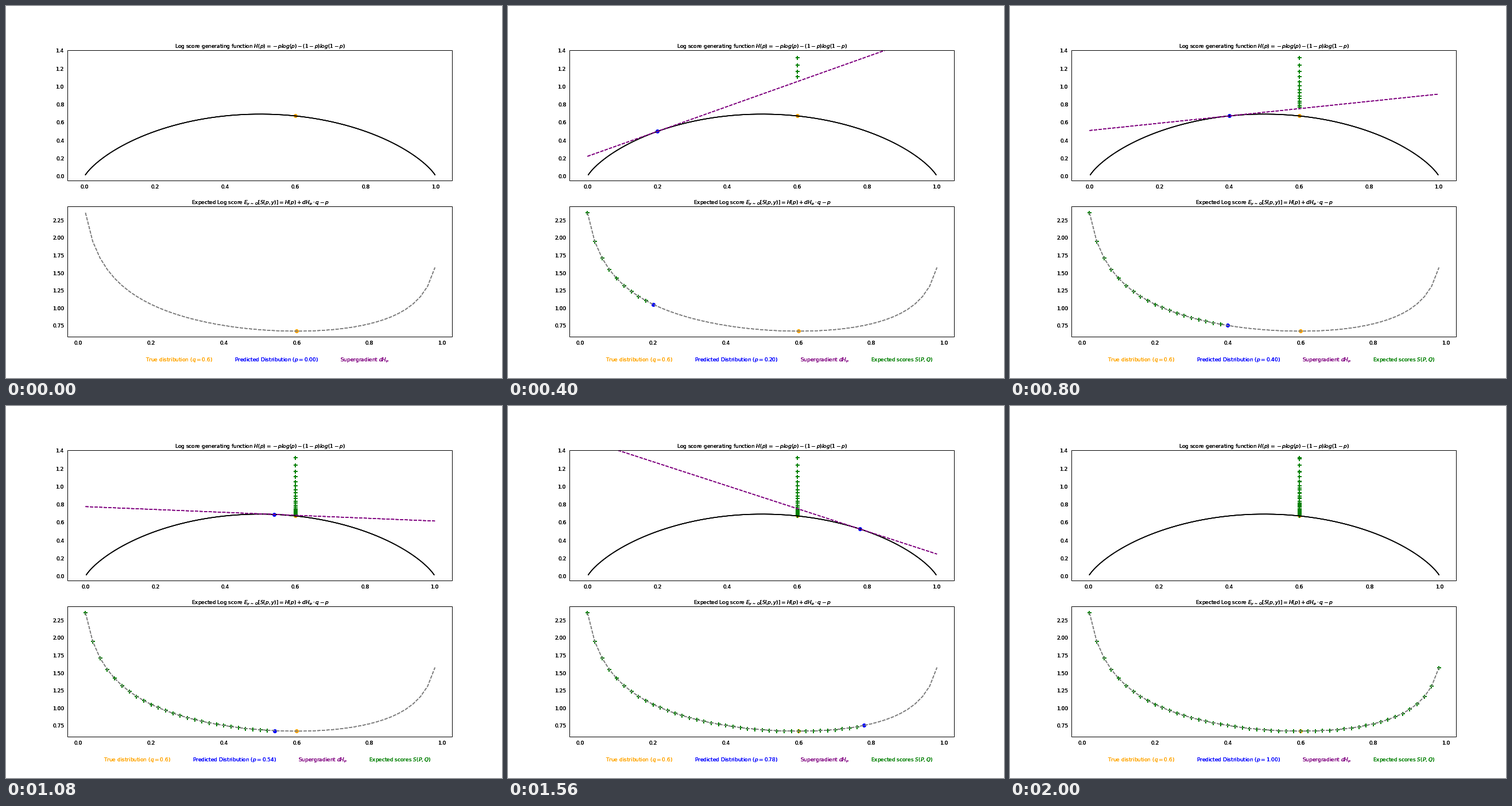
Recreate the animation shown at these times as a matplotlib script. Size 864x648 px, loop 2040 ms.

```python
import numpy as np
import matplotlib.pyplot as plt
from matplotlib.animation import FuncAnimation
from matplotlib.collections import PathCollection
from matplotlib.lines import Line2D
from matplotlib.patches import Rectangle
from matplotlib.text import Text
from matplotlib.transforms import Affine2D

W, H, DPI = 864, 648, 72
STEPS = 50
Q = 0.6

plt.rcParams.update({
    "font.family": "DejaVu Sans",
    "font.size": 9,
    "mathtext.fontset": "dejavusans",
    "lines.linewidth": 1.5,
})


def entropy(p):
    return -p * np.log(p) - (1 - p) * np.log(1 - p)


def slope(p):
    return np.log((1 - p) / p)


def score(p):
    """Expected log score of forecast p under the true probability Q."""
    return entropy(p) + slope(p) * (Q - p)


def padded(lo, hi, margin=0.05):
    pad = margin * (hi - lo)
    return lo - pad, hi + pad


def style(ax, title, yticks, fmt):
    ax.set_title(title, fontsize=9, pad=4.5)
    ax.tick_params(axis="x", length=0, pad=6.7)
    ax.tick_params(axis="y", length=0, pad=6.3)
    ax.set_xticks(np.arange(6) / 5, [f"{k / 5:.1f}" for k in range(6)])
    ax.set_yticks(yticks, [format(y, fmt) for y in yticks])
    # Frame on the outer pixel of the axes edge
    ax.spines[:].set_visible(False)
    ax.add_patch(Rectangle((0, 0), 1, 1, fill=False, lw=1, zorder=2.5,
                           clip_on=False,
                           transform=ax.transAxes + Affine2D().translate(-1, 1)))


def dots(ax, color, x=(), y=()):
    return ax.scatter(x, y, s=25, color=color, linewidths=1.5)


def crosses(ax):
    return ax.scatter([], [], s=49, marker="+", color="green", linewidths=1.5)


def harden(artist, passes=3):
    """Draw an artist several times over, so its soft edges turn solid."""
    draw = artist.draw

    def repeat(renderer):
        for _ in range(passes):
            draw(renderer)

    artist.draw = repeat


fig, (top, low) = plt.subplots(2, 1, figsize=(W / DPI, H / DPI), dpi=DPI)
fig.subplots_adjust(left=0.125, right=0.9, bottom=0.11, top=0.88, hspace=0.2)

style(top,
      r"Log score generating function $H(p) {=} -plog(p) - (1-p)log(1-p)$",
      np.arange(8) / 5, ".1f")
style(low,
      r"Expected Log score $E_{y\,\sim\,Q}[S(p, y)] = H(p) + dH_p \cdot q - p$",
      np.arange(3, 10) / 4, ".2f")

# Generating function and its tangent
xs = np.linspace(0, 1, 400)[1:-1]
top.plot(xs, entropy(xs), color="black")
tangent, = top.plot([], [], "--", color="purple")
top.set_ylim(-0.05, 1.4)

# Expected score
ps = np.arange(1, STEPS) / STEPS
scores = score(ps)
low.plot(ps, scores, "--", color="gray")
low.set_xlim(*padded(ps[0], ps[-1]))
low.set_ylim(*padded(scores.min(), scores.max()))

for ax in (top, low):
    dots(ax, "orange", [Q], [entropy(Q)])
top_cross, low_cross = crosses(top), crosses(low)
top_dot, low_dot = dots(top, "blue"), dots(low, "blue")

# Caption row: x offset, text, colour
CAPTIONS = [
    (0, "True distribution ($q = 0.6$)", "orange"),
    (154.7, "", "blue"),
    (338.8, "Supergradient $dH_p$", "purple"),
    (462.2, "Expected scores $S(P, Q)$", "green"),
]
captions = [fig.text(0, 1 - 619.3 / H, text, color=color)
            for _, text, color in CAPTIONS]

for artist in fig.findobj(
        lambda a: isinstance(a, (Text, Line2D, PathCollection))):
    harden(artist)


def update(i):
    p = i / STEPS
    inner = 0 < i < STEPS

    if inner:
        ends = np.array([0.0, 1.0])
        tangent.set_data(ends, entropy(p) + slope(p) * (ends - p))
        top_dot.set_offsets([[p, entropy(p)]])
        low_dot.set_offsets([[p, score(p)]])
        top.set_xlim(*padded(0, 1))
    else:
        tangent.set_data([], [])
        top.set_xlim(*padded(xs[0], xs[-1]))
    for artist in (tangent, top_dot, low_dot):
        artist.set_visible(inner)

    done = max(i - 1, 0)
    top_cross.set_offsets(np.column_stack([np.full(done, Q), scores[:done]]))
    low_cross.set_offsets(np.column_stack([ps[:done], scores[:done]]))

    captions[1].set_text(f"Predicted Distribution ($p = {p:.2f}$)")
    captions[3].set_visible(i > 0)
    left = 170 if i > 0 else 243
    for label, (dx, _, _) in zip(captions, CAPTIONS):
        label.set_x((left + dx) / W)
    return []


anim = FuncAnimation(fig, update, frames=STEPS + 1, interval=40,
                     init_func=lambda: update(0), repeat=True, repeat_delay=0)
plt.show()
```
